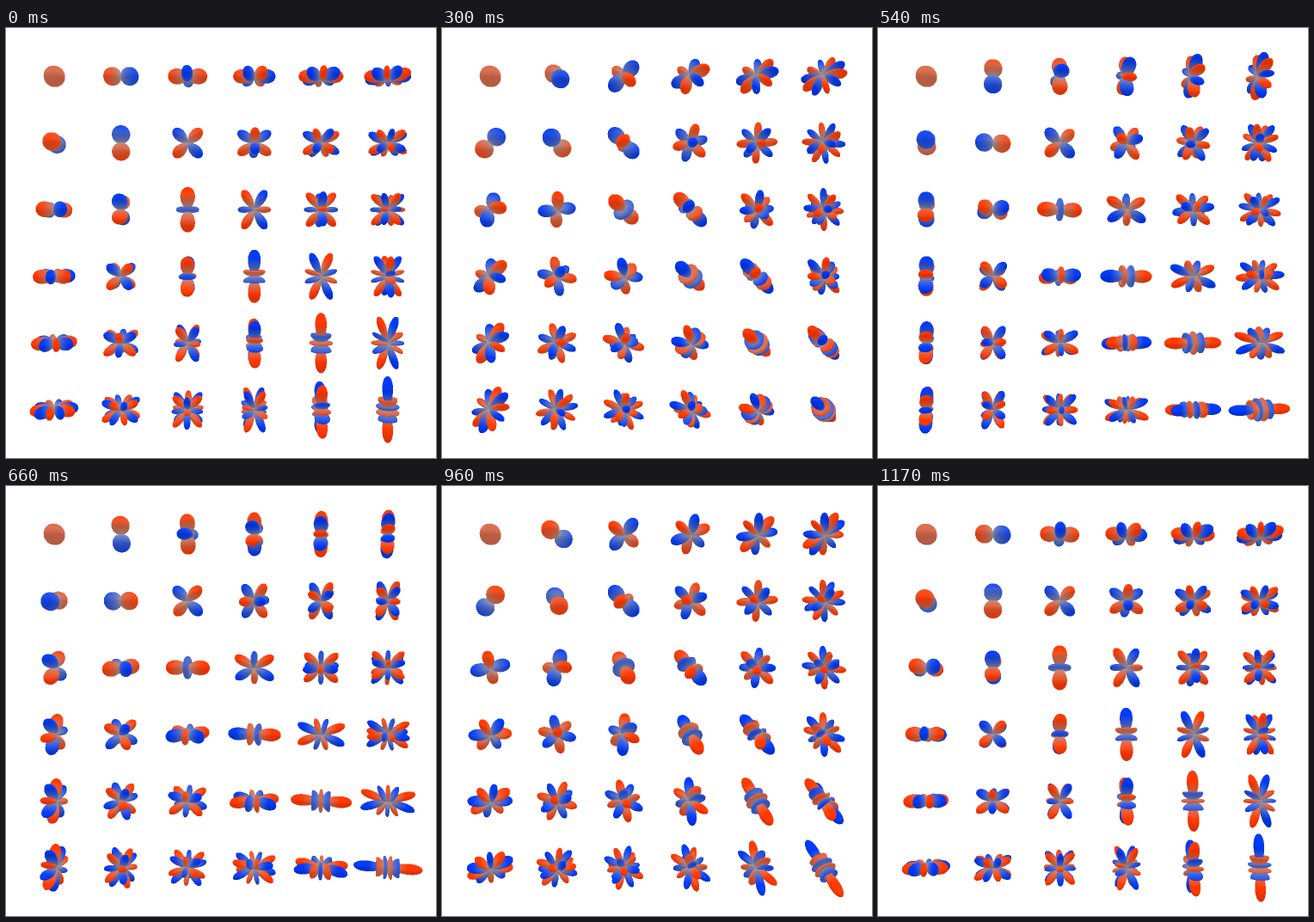
A matplotlib script for the animation above (1200 ms loop, 500 by 500 pixels).

```python
import math

import matplotlib.pyplot as plt
import numpy as np
from matplotlib.animation import FuncAnimation
from numpy.polynomial import Legendre

SIZE = 500            # stage in pixels
EYE = 690             # camera distance in pixels
FRAMES = 40
CELLS = 6
SPACING = 77.5        # distance between neighbouring shapes
SCALE = 40.8          # pixels per unit of |Y|
DENSITY = 6           # surface samples per square pixel
OVER = 2              # supersampling

GREY = np.array([158, 158, 158])
RED = np.array([255, 56, 0])
BLUE = np.array([0, 56, 240])

rng = np.random.default_rng(1)


def harmonic(l, m, theta, phi):
    """Real spherical harmonic; negative m gives the sine version."""
    k = abs(m)
    norm = (2 * l + 1) / (4 * math.pi) * math.factorial(l - k) / math.factorial(l + k)
    value = math.sqrt(norm) * np.sin(theta) ** k * Legendre.basis(l).deriv(k)(np.cos(theta))
    if m > 0:
        value = value * math.sqrt(2) * np.cos(k * phi)
    elif m < 0:
        value = value * math.sqrt(2) * np.sin(k * phi)
    return value


def signed_point(l, m, theta, phi):
    """Y times the unit direction, in axes right, up, towards the viewer."""
    direction = np.stack([-np.sin(theta) * np.cos(phi),
                          -np.cos(theta),
                          np.sin(theta) * np.sin(phi)], axis=-1)
    return SCALE * harmonic(l, m, theta, phi)[:, None] * direction


def area_vector(l, m, theta, phi, eps=1e-4):
    """Outward normal scaled by the area per unit of theta and phi."""
    d_theta = signed_point(l, m, theta + eps, phi) - signed_point(l, m, theta - eps, phi)
    d_phi = signed_point(l, m, theta, phi + eps) - signed_point(l, m, theta, phi - eps)
    normal = np.cross(d_theta, d_phi) / (4 * eps * eps)
    outward = np.sum(normal * signed_point(l, m, theta, phi), axis=1)
    outward *= harmonic(l, m, theta, phi)
    return normal * np.where(outward < 0, -1, 1)[:, None]


def sample_surface(l, m, rows=60, cols=120):
    """Points spread evenly over the surface, with normals and colours."""
    dt, dp = math.pi / rows, 2 * math.pi / cols
    theta, phi = np.meshgrid((np.arange(rows) + 0.5) * dt,
                             (np.arange(cols) + 0.5) * dp, indexing="ij")
    theta, phi = theta.ravel(), phi.ravel()
    area = np.cumsum(np.linalg.norm(area_vector(l, m, theta, phi), axis=1) * dt * dp)
    count = int(area[-1] * DENSITY)
    picks = np.searchsorted(area, (np.arange(count) + 0.5) / count * area[-1])
    theta = theta[picks] + (rng.random(count) - 0.5) * dt
    phi = phi[picks] + (rng.random(count) - 0.5) * dp

    value = harmonic(l, m, theta, phi)
    points = signed_point(l, m, theta, phi) * np.sign(value)[:, None]
    normals = area_vector(l, m, theta, phi)
    normals /= np.linalg.norm(normals, axis=1, keepdims=True) + 1e-12
    strength = np.clip(np.abs(value) / 0.55, 0, 1)[:, None]
    tip = np.where(value[:, None] > 0, RED, BLUE)
    return points, normals, GREY + (tip - GREY) * strength


def build_table():
    parts = []
    middle = (CELLS - 1) / 2
    for row in range(CELLS):
        for col in range(CELLS):
            points, normals, colours = sample_surface(max(row, col), col - row)
            centre = np.array([(col - middle) * SPACING, (middle - row) * SPACING, 0])
            parts.append((points, normals, colours, np.tile(centre, (len(points), 1))))
    return [np.concatenate(group).astype(np.float32) for group in zip(*parts)]


def rotation(angle):
    """Turn about the diagonal axis that runs down to the right."""
    x, y, z = math.sqrt(0.5), -math.sqrt(0.5), 0
    cross = np.array([[0, -z, y], [z, 0, -x], [-y, x, 0]])
    turn = np.eye(3) + math.sin(angle) * cross + (1 - math.cos(angle)) * cross @ cross
    return turn.astype(np.float32)


POINTS, NORMALS, COLOURS, CENTRES = build_table()


def render(frame):
    turn = rotation(2 * math.pi * frame / FRAMES)
    normals = NORMALS @ turn.T
    places = POINTS @ turn.T + CENTRES
    to_eye = np.array([0, 0, EYE], dtype=np.float32) - places
    front = np.flatnonzero(np.einsum("ij,ij->i", normals, to_eye) > 0)
    front = front[np.argsort(places[front, 2])]

    # perspective projection, nearest points written last
    zoom = EYE / to_eye[front, 2]
    px = SIZE / 2 + places[front, 0] * zoom
    py = SIZE / 2 - places[front, 1] * zoom
    width = SIZE * OVER
    ix = np.floor(px * OVER - 0.5).astype(np.int64)
    iy = np.floor(py * OVER - 0.5).astype(np.int64)
    spots = (iy * width + ix)[:, None] + np.array([0, 1, width, width + 1])
    buffer = np.full(width * width, -1)
    buffer[spots.ravel()] = np.repeat(front, 4)

    # light from above
    hit = buffer >= 0
    ids = buffer[hit]
    light = 0.965 + 0.095 * np.tanh(5 * normals[ids, 1])
    image = np.full((width * width, 3), 255, dtype=np.float32)
    image[hit] = np.clip(COLOURS[ids] * light[:, None], 0, 255)
    image = image.reshape(SIZE, OVER, SIZE, OVER, 3).mean(axis=(1, 3))
    return np.round(image).astype(np.uint8)


pictures = [render(frame) for frame in range(FRAMES)]

fig = plt.figure(figsize=(5, 5), dpi=100, facecolor="white")
ax = fig.add_axes([0, 0, 1, 1])
ax.axis("off")
view = ax.imshow(pictures[0], interpolation="nearest", aspect="auto")


def update(frame):
    view.set_data(pictures[frame])
    return [view]


anim = FuncAnimation(fig, update, frames=FRAMES, interval=30, repeat=True,
                     repeat_delay=0, blit=False)
plt.show()
```
